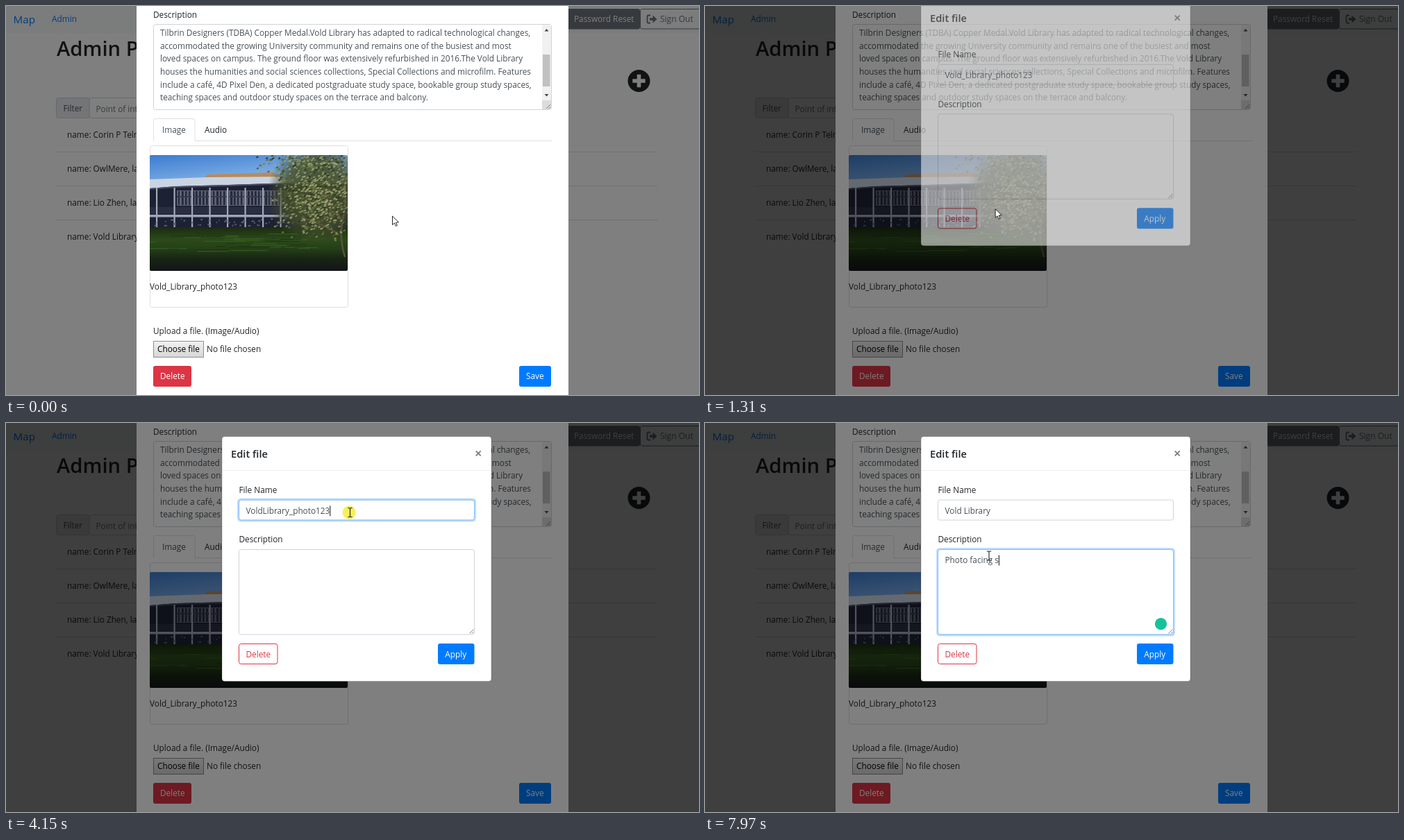
An HTML page that plays this animation: 998x561 px, repeating every 8 s.

```html
<!DOCTYPE html>
<html lang="en">
<head>
<meta charset="utf-8">
<title>Edit file dialog</title>
<style>
html, body { margin: 0; width: 100%; height: 100%; overflow: hidden; background: #fff; }
svg { display: block; }
text { font-family: 'Open Sans', 'Noto Sans', sans-serif; font-size: 11.8px; white-space: pre; font-variant-ligatures: none; }
</style>
</head>
<body>
<svg id="stage" width="998" height="561" viewBox="0 0 998 561" xmlns="http://www.w3.org/2000/svg">
  <defs>
    <linearGradient id="sky" x1="0" y1="0" x2=".6" y2="1">
      <stop offset="0" stop-color="#3c7ccf"/><stop offset="1" stop-color="#a3cbf2"/>
    </linearGradient>
    <linearGradient id="lawn" x1="0" y1="0" x2="0" y2="1">
      <stop offset="0" stop-color="#1c2b12"/><stop offset=".28" stop-color="#2b4a1a"/>
      <stop offset=".5" stop-color="#243f17"/><stop offset=".72" stop-color="#172513"/>
      <stop offset="1" stop-color="#141419"/>
    </linearGradient>
    <radialGradient id="crown">
      <stop offset="0" stop-color="#444e2d"/><stop offset=".65" stop-color="#444e2d" stop-opacity=".85"/>
      <stop offset="1" stop-color="#444e2d" stop-opacity="0"/>
    </radialGradient>
    <linearGradient id="grey" x1="0" y1="0" x2="0" y2="1">
      <stop offset="0" stop-color="#f2f2f2"/><stop offset="1" stop-color="#d6d6d6"/>
    </linearGradient>
    <clipPath id="frame"><rect x="207" y="215" width="285" height="167" rx="2"/></clipPath>
    <clipPath id="picked"><rect id="pickedBox" y="112" height="28"/></clipPath>
  </defs>
</svg>
<script>
const LOOP = 8000;
const INK = '#212529', MUTED = '#495057', EDGE = '#ced4da', RULE = '#dee2e6';
const BLUE = '#007bff', RED = '#dc3545', SLATE = '#6c757d';
const svg = document.getElementById('stage');

function set(node, attrs) {
  for (const key in attrs) node.setAttribute(key, attrs[key]);
}
function el(parent, tag, attrs) {
  const node = document.createElementNS('http://www.w3.org/2000/svg', tag);
  set(node, attrs);
  return parent.appendChild(node);
}
const group = (parent, attrs = {}) => el(parent, 'g', attrs);
const rect = (parent, x, y, width, height, fill, more = {}) =>
  el(parent, 'rect', { x, y, width, height, fill, ...more });
const box = (parent, x, y, w, h, fill, stroke, rx = 3) =>
  rect(parent, x, y, w, h, fill, { stroke, rx });
const path = (parent, d, fill, more = {}) => el(parent, 'path', { d, fill, ...more });
const line = (parent, d, stroke, width = 1) =>
  path(parent, d, 'none', { stroke, 'stroke-width': width });
function label(parent, x, y, str, fill = INK, size, weight) {
  const node = el(parent, 'text', { x, y, fill });
  if (size) node.style.fontSize = size + 'px';
  if (weight) node.style.fontWeight = weight;
  node.textContent = str;
  return node;
}
function grip(parent, x, y) {
  line(parent, `M${x - 6} ${y}l6 -6M${x - 2.5} ${y}l2.5 -2.5`, '#777', .9);
}

// Admin page
const page = group(svg);
rect(page, 0, 0, 998, 561, '#fff');
rect(page, 0, 0, 998, 40, '#f8f9fa');
label(page, 10.5, 25, 'Map', BLUE, 15.2);
label(page, 66, 23.3, 'Admin', BLUE);
box(page, 800, 4, 113, 29.5, SLATE, 'none');
label(page, 818, 23.3, 'Password Reset', '#fff');
box(page, 913.5, 4.5, 90, 28.5, 'none', SLATE);
label(page, 942, 23.3, 'Sign Out', SLATE, 12);
path(page, 'M928 13.5h-3a1.5 1.5 0 0 0-1.5 1.5v8a1.5 1.5 0 0 0 1.5 1.5h3', 'none',
  { stroke: SLATE, 'stroke-width': 1.8 });
path(page, 'M927 17.2h4.5v-3.7l6 5.5l-6 5.5v-3.7h-4.5z', SLATE);
label(page, 73, 71.5, 'Admin Panel', INK, 29.2, 600);
el(page, 'circle', { cx: 911.5, cy: 108, r: 16, fill: INK });
line(page, 'M902.3 108h18.4M911.5 98.8v18.4', '#fff', 5.6);
box(page, 120, 132.5, 400, 29, '#fff', EDGE);
box(page, 72.5, 132.5, 47.5, 29, '#e9ecef', EDGE);
label(page, 82.5, 152, 'Filter', MUTED);
label(page, 129.5, 152.5, 'Point of interest', SLATE);
['Corin P Telmar', 'OwlMere, lat', 'Lio Zhen, lat', 'Vold Library, lat'].forEach((name, i) => {
  label(page, 88, 189.5 + 49 * i, 'name: ' + name);
  if (i < 3) line(page, `M72.5 ${210.5 + 49 * i}H938`, '#dfdfdf');
});
rect(svg, 0, 0, 998, 561, '#000', { opacity: .5 });

// Place editor
const editor = group(svg);
rect(editor, 188, 0, 622, 561, '#fff');
label(editor, 212, 16.5, 'Description');
box(editor, 212.5, 26.5, 573, 123, '#fff', EDGE);
[
  'Tilbrin Designers (TDBA) Copper Medal.Vold Library has adapted to radical technological changes,',
  'accommodated the growing University community and remains one of the busiest and most',
  'loved spaces on campus. The ground floor was extensively refurbished in 2016.The Vold Library',
  'houses the humanities and social sciences collections, Special Collections and microfilm. Features',
  'include a café, 4D Pixel Den, a dedicated postgraduate study space, bookable group study spaces,',
  'teaching spaces and outdoor study spaces on the terrace and balcony.'
].forEach((str, i) => label(editor, 222, 42.9 + 18.7 * i, str, MUTED));
rect(editor, 772, 27, 13, 109, '#f1f1f1');
rect(editor, 773, 70, 10.5, 46, '#c1c1c1');
path(editor, 'M775.5 36.5h6l-3 -3.5zM775.5 127h6l-3 3.5z', '#444');
rect(editor, 772, 136, 13, 13, '#dcdcdc');
grip(editor, 784, 148);
line(editor, 'M212 194.5H786', RULE);
path(editor, 'M212.5 195V165.5a3 3 0 0 1 3 -3H269a3 3 0 0 1 3 3V195', '#fff', { stroke: RULE });
rect(editor, 213, 194, 58.5, 2, '#fff');
label(editor, 225, 183.3, 'Image', MUTED);
label(editor, 286, 183.3, 'Audio');
box(editor, 207.5, 201.5, 285, 233, '#fff', '#dfdfdf');
label(editor, 207, 409.3, 'Vold_Library_photo123');
label(editor, 212, 473, 'Upload a file. (Image/Audio)');
box(editor, 212.5, 483.5, 72, 23, 'url(#grey)', '#8f8f8f', 0);
label(editor, 218, 499.3, 'Choose file', '#000');
label(editor, 289, 499.3, 'No file chosen');
box(editor, 212, 519, 55, 30, RED, 'none');
label(editor, 222, 538.3, 'Delete', '#fff');
box(editor, 739, 519, 46, 30, BLUE, 'none');
label(editor, 749, 538.3, 'Save', '#fff');

function drawPhoto(parent) {
  let seed = 11;
  const rnd = (from = 0, to = 1) => {
    seed = seed * 16807 % 2147483647;
    return +(from + (to - from) * seed / 2147483647).toFixed(1 + (to <= 1));
  };
  const mid = (center, reach) => center + (rnd() + rnd() - 1) * reach;
  const g = group(parent, { 'clip-path': 'url(#frame)' });
  rect(g, 207, 215, 285, 55, 'url(#sky)');

  // Building
  rect(g, 207, 256, 285, 64, '#1d2134');
  rect(g, 246, 266, 160, 22, '#5f6273');
  for (let x = 248; x < 404; x += 5) rect(g, x, 267, rnd(2, 3.6), 20, '#25293c');
  rect(g, 246, 274, 160, 2, '#363a4d');
  rect(g, 207, 290, 200, 10, '#2a2e40');
  path(g, 'M286 248L290 243L384 240L400 248Z', '#b58c60');
  path(g, 'M207 250L290 247L410 246V255L320 258L245 260L207 263Z', '#cad4e2');
  line(g, 'M207 264L245 261L320 259L410 256', '#454b62', 2);
  for (let x = 216; x < 410; x += 25.5) rect(g, x, 262, 2.2, 57, '#a4a9b8');
  rect(g, 207, 301, 200, 3.5, '#a0a6b8');
  for (let i = 0; i < 40; i++) rect(g, rnd(209, 400), rnd(306, 316), rnd(1, 4), 2, '#5a6072');

  // Lawn with bands of light
  rect(g, 207, 319, 285, 63, 'url(#lawn)');
  for (let i = 0; i < 36; i++)
    line(g, `M${rnd(200, 430)} ${rnd(326, 354)}h${rnd(15, 60)}`, i % 2 ? '#3a6423' : '#1d3410', .9);

  // Tree
  el(g, 'ellipse', { cx: 448, cy: 270, rx: 72, ry: 76, fill: 'url(#crown)' });
  line(g, 'M488 362Q480 335 484 312Q474 290 455 270M484 312Q490 290 489 260M480 330Q460 315 425 305',
    '#5d4f3b', 2.6);
  ['#77814c', '#4b5631', '#2d3720', '#8f9865', '#5c683a', '#a2a87b'].forEach(color => {
    let d = '';
    for (let i = 0; i < 190; i++) {
      const high = i % 5 === 0;
      const x = high ? mid(440, 82) : mid(446, 66), y = high ? mid(222, 18) : mid(274, 64);
      d += `M${x.toFixed(1)} ${y.toFixed(1)}q${rnd(1, 3)} -2 ${rnd(2, 4)} .5q-2 2 -4 1z`;
    }
    path(g, d, color, { opacity: .85 });
  });
}
drawPhoto(editor);

const shade = rect(svg, 0, 0, 998, 561, '#000');

// File dialog
const dialog = group(svg);
box(dialog, 311, 19.5, 388, 353, '#fff', 'rgba(0,0,0,.2)', 4);
label(dialog, 324, 49.5, 'Edit file', INK, 14.7, 600);
line(dialog, 'M676.7 40.3l7 7M683.7 40.3l-7 7', '#7f7f7f', 1.9);
line(dialog, 'M311.5 68.5H698.5', '#e9ecef');
label(dialog, 335.5, 100.5, 'File Name');
label(dialog, 335.5, 172.2, 'Description');

function field(y, h, textY) {
  const ring = rect(dialog, 334.2, y - 1.3, 341.6, h + 2.6, 'none',
    { rx: 4, stroke: BLUE, 'stroke-width': 2.6 });
  box(dialog, 335.5, y, 339, h, '#fff', EDGE);
  const tint = box(dialog, 335.5, y, 339, h, 'none', '#80bdff');
  const text = label(dialog, 345.5, textY, '', MUTED);
  const caret = rect(dialog, 0, textY - 11.5, 1, 15, '#111');
  return { ring, tint, text, caret };
}
const nameField = field(111, 29, 130.8);
const noteField = field(182.5, 122.5, 202);
const mark = rect(dialog, 0, 118, 0, 16, '#3390ff');
const markText = label(dialog, 345.5, 130.8, '', '#fff');
set(markText, { 'clip-path': 'url(#picked)' });
const pickedBox = document.getElementById('pickedBox');
grip(dialog, 673.5, 303.5);
const badge = el(dialog, 'circle', { cx: 656.5, cy: 289.7, r: 8.6, fill: '#15c39a' });
box(dialog, 335.5, 318.5, 55.5, 29, '#fff', RED);
label(dialog, 345.5, 337.6, 'Delete', RED);
box(dialog, 622, 318, 52.5, 30, BLUE, 'none');
label(dialog, 632.3, 337.6, 'Apply', '#fff');

// Pointer
const halo = el(svg, 'circle', { r: 9.6, fill: '#f6ea2c' });
const arrow = path(svg, 'M0 0V12.6L2.9 9.9L4.9 14.4L6.9 13.5L5 9.2L9 8.9Z', '#fff',
  { stroke: '#111', 'stroke-width': .9 });
const beam = line(svg, 'M-3.2 -6.5h2q1.2 0 1.2 1.2q0 -1.2 1.2 -1.2h2M0 -5.5V5.5M-3.2 6.5h2q1.2 0 1.2 -1.2q0 1.2 1.2 1.2h2', '#222', 1.1);

// Time, x, y
const route = [
  [0, 556.5, 303], [40, 556.5, 303], [180, 531.5, 302], [400, 531.5, 302], [780, 418, 293],
  [1300, 418, 293], [1790, 504.5, 129], [2150, 504.5, 129], [2550, 333, 138], [2810, 347, 115],
  [2860, 347, 115], [3200, 377, 128], [3690, 377, 128], [4080, 495.5, 129], [4170, 495.5, 129],
  [4450, 411, 135], [4520, 411, 135], [4850, 370, 131], [5050, 370, 131], [5280, 377, 132],
  [5350, 377, 132], [5800, 361, 196], [6170, 361, 196], [6360, 377, 196], [6860, 377, 196],
  [7250, 409, 191.5]
];
const presses = [[810, 1060], [2060, 2600], [3230, 3340], [4130, 4450], [4900, 5040], [5840, 5960]];

const clamp = v => Math.max(0, Math.min(1, v));
const ramp = (t, from, span) => clamp((t - from) / span);
const smooth = p => p * p * (3 - 2 * p);

function pointAt(t) {
  const i = route.findIndex(p => p[0] > t);
  if (i < 0) return route[route.length - 1].slice(1);
  const [t0, x0, y0] = route[i - 1], [t1, x1, y1] = route[i];
  const p = smooth((t - t0) / (t1 - t0));
  return [x0 + (x1 - x0) * p, y0 + (y1 - y0) * p];
}
const lengthTo = (node, n) => n > 0 ? node.getSubStringLength(0, n) : 0;
function indexAt(node, x) {
  let best = 0, gap = Infinity;
  for (let n = 0; n <= node.textContent.length; n++) {
    const d = Math.abs(345.5 + lengthTo(node, n) - x);
    if (d < gap) { gap = d; best = n; }
  }
  return best;
}
function nameAt(t) {
  if (t < 3520) return 'Vold_Library_photo123';
  if (t < 4640) return 'VoldLibrary_photo123';
  return t < 5200 ? 'VoldLibrary' : 'Vold Library';
}
function caretAt(t, len) {
  if (t < 3230 || (t >= 4130 && t < 4900)) return len;
  if (t < 3520) return 5;
  return t < 5200 ? 4 : 5;
}
function write(node, str) {
  if (node.textContent !== str) node.textContent = str;
}
function focus(f, amount) {
  set(f.ring, { opacity: .25 * amount });
  set(f.tint, { opacity: amount });
}
function placeCaret(f, n, on) {
  set(f.caret, { x: 345.5 + lengthTo(f.text, n), opacity: on ? 1 : 0 });
}

function draw(t) {
  const [x, y] = pointAt(t);
  const down = presses.some(([a, b]) => t >= a && t < b);

  set(shade, { opacity: t < 1070 ? 0 : .5 * ramp(t, 1034, 150) });
  const slide = 1 - ramp(t, 1230, 300);
  set(dialog, {
    opacity: ramp(t, 1230, 150),
    transform: `translate(0 ${(-50 * slide * slide).toFixed(2)})`
  });

  const name = nameAt(t), len = name.length;
  write(nameField.text, name);
  write(markText, name);
  let from = len;
  if (t >= 2150 && t < 3230) from = t < 2550 ? indexAt(nameField.text, x) : 0;
  if (t >= 4170 && t < 4640) from = indexAt(nameField.text, x);
  const start = lengthTo(nameField.text, from);
  const span = { x: 345.5 + start, width: lengthTo(nameField.text, len) - start };
  set(mark, span);
  set(pickedBox, span);

  const leave = ramp(t, 5860, 150);
  focus(nameField, ramp(t, 2060, 150) * (1 - leave));
  focus(noteField, leave);
  placeCaret(nameField, caretAt(t, len), t >= 2060 && t < 5860 && from === len);

  const typed = Math.max(0, Math.min(14, Math.floor((t - 6870) / 58) + 1));
  write(noteField.text, 'Photo facing s'.slice(0, typed));
  placeCaret(noteField, typed, t >= 5860);
  set(badge, { opacity: ramp(t, 6950, 120) });

  const inside = x > 335 && x < 675 && ((y > 110 && y < 141) || (y > 182 && y < 305));
  const isBeam = t > 1400 && (inside || down);
  const at = `translate(${x.toFixed(2)} ${y.toFixed(2)})`;
  set(arrow, { transform: at, opacity: isBeam ? 0 : 1 });
  set(beam, { transform: at, opacity: isBeam ? 1 : 0 });
  set(halo, { cx: isBeam ? x - 1.3 : x, cy: y, opacity: down ? .78 : 0 });
}

function tick() {
  draw(performance.now() % LOOP);
  requestAnimationFrame(tick);
}
tick();
</script>
</body>
</html>
```
